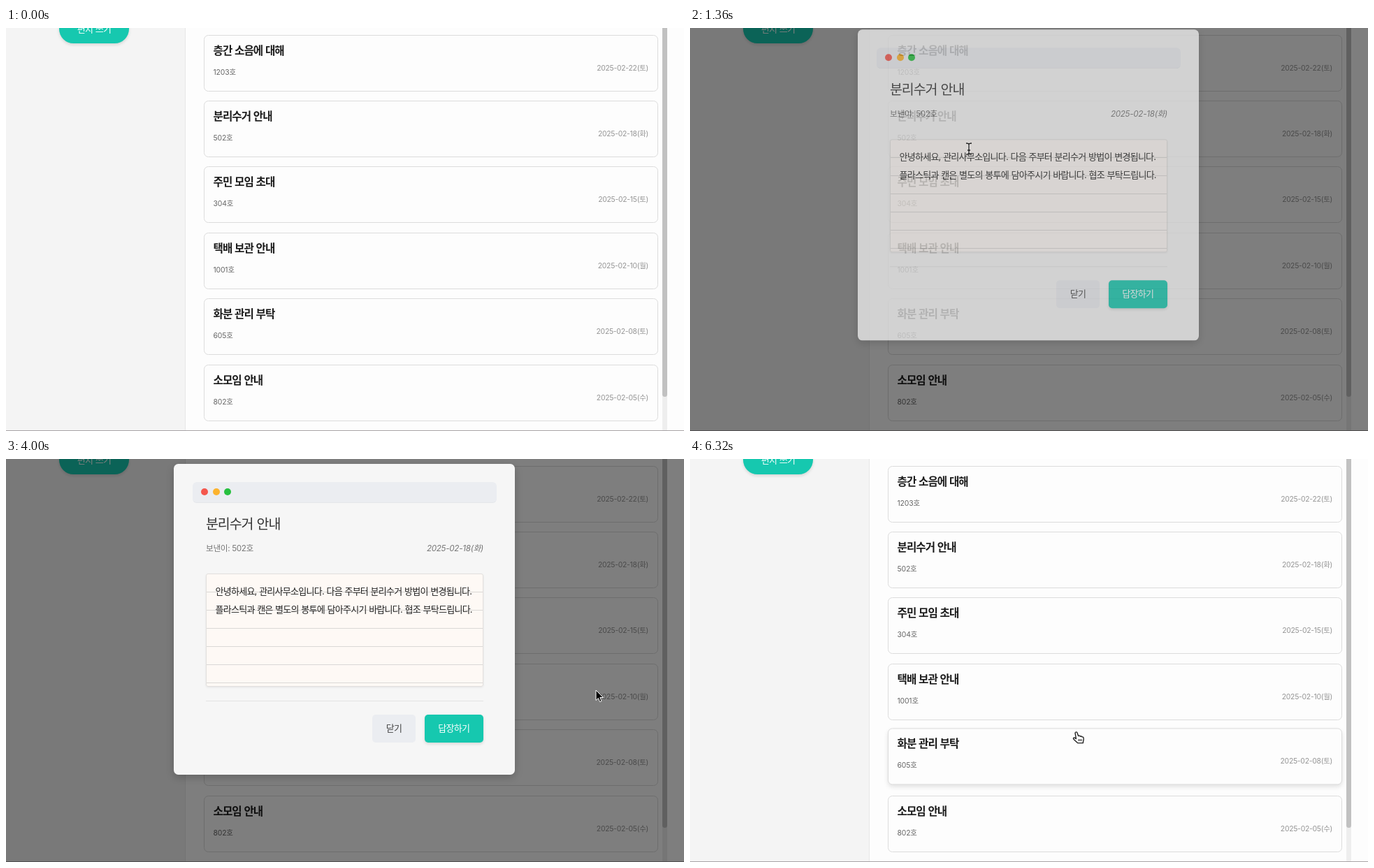
An HTML page for the animation above (6.4 s loop, 970x577 px).

```html
<!DOCTYPE html>
<html lang="ko">
<head>
<meta charset="utf-8">
<style>
html, body { margin: 0; width: 100%; height: 100%; overflow: hidden; }
body { position: relative; background: #fdfdfd; font: 13px Inter, "Noto Sans CJK KR", "Noto Sans CJK JP", sans-serif; }
div { position: absolute; box-sizing: border-box; white-space: nowrap; }
.full { inset: 0; }
.side { left: 0; top: 0; width: 257px; height: 577px; background: #f4f4f4; border-right: 1px solid #e7e7e7; }
.card { left: 283px; width: 650px; height: 81px; background: #fdfdfd; border: 1px solid #dcdcdc; border-radius: 6.5px; }
.t { height: 20px; line-height: 20px; }
.ko { letter-spacing: -.057em; word-spacing: .048em; }
.head { font-size: 15.6px; font-weight: 600; letter-spacing: -.061em; color: #1c1c1c; }
.room { font-size: 10.4px; letter-spacing: -.015em; color: #666; }
.date { font-size: 10.4px; letter-spacing: -.026em; color: #959595; }
.btn { text-align: center; border-radius: 5px; }
.teal { background: #16c8af; color: #fff; box-shadow: 0 2px 4px rgba(0,0,0,.13); }
.dot { top: 42px; width: 10px; height: 10px; border-radius: 50%; }
#dim { background: rgba(0,0,0,.5); }
.box { left: 240px; top: 7px; width: 488px; height: 445px; background: #f6f6f6; border-radius: 6.5px; box-shadow: 0 4px 12px rgba(0,0,0,.2); }
.bar { left: 267px; top: 33px; width: 435px; height: 30px; background: #ebedf1; border-radius: 6px; border-bottom: 1px solid #e4e6ea; }
.paper { left: 286px; top: 164px; width: 397px; height: 162px; border: 1px solid #e2e0de; border-radius: 3px; box-shadow: 0 1px 3px rgba(0,0,0,.08);
  background: repeating-linear-gradient(#fef9f5 0 25px, #dad8d6 25px 26px); }
svg { position: absolute; left: 0; top: 0; overflow: visible; }
</style>
</head>
<body>
<div class="side"></div>
<div class="btn teal ko" style="left:76px;top:-19px;width:100px;height:41px;line-height:41px;border-radius:21px">편지 쓰기</div>
<div id="list" class="full"></div>
<div style="left:939px;top:0;width:7px;height:577px;background:#eee"></div>
<div style="left:939px;top:-9px;width:7px;height:537px;background:#c1c1c1;border-radius:4px"></div>
<div style="left:0;top:576px;width:970px;height:1px;background:#a8a4a6"></div>
<div id="dim" class="full"></div>
<div id="modal" class="full">
  <div class="box"></div>
  <div class="bar"></div>
  <div class="dot" style="left:279px;background:#f4574d"></div>
  <div class="dot" style="left:295.5px;background:#fcb32e"></div>
  <div class="dot" style="left:312px;background:#27c03f"></div>
  <div class="t ko" style="left:286px;top:83px;font-size:19.5px;color:#333">분리수거 안내</div>
  <div class="t" style="left:286px;top:118px;font-size:11.7px;letter-spacing:-.03em;color:#777">보낸이: 502호</div>
  <div class="t" style="right:287px;top:118px;font-size:11.7px;letter-spacing:-.026em;font-style:italic;color:#777">2025-02-18(화)</div>
  <div class="paper"></div>
  <div class="t ko" style="left:299.5px;top:179px;color:#222">안녕하세요, 관리사무소입니다. 다음 주부터 분리수거 방법이 변경됩니다.</div>
  <div class="t ko" style="left:299.5px;top:205px;color:#222">플라스틱과 캔은 별도의 봉투에 담아주시기 바랍니다. 협조 부탁드립니다.</div>
  <div style="left:286px;top:346px;width:397px;height:1px;background:#e4e4e4"></div>
  <div id="close" class="btn ko" style="left:524px;top:366px;width:62px;height:40px;line-height:39px;color:#444">닫기</div>
  <div id="reply" class="btn teal ko" style="left:599px;top:366px;width:83.5px;height:40px;line-height:39px">답장하기</div>
</div>
<svg id="cursor" width="1" height="1">
  <g id="beam" fill="none">
    <path d="M0-7V7" stroke="#fff" stroke-opacity=".7" stroke-width="3"/>
    <path d="M-4-8Q0-8 0-6Q0-8 4-8M0-6V6M-4 8Q0 8 0 6Q0 8 4 8M-2 2H2" stroke="#222" stroke-width="1.4"/>
  </g>
  <path id="arrow" d="M0 0V14.5L3.4 11.4 5.6 16.6 8 15.6 5.8 10.5H10.5Z" fill="#000" stroke="#fff"/>
  <g id="hand" stroke="#222" stroke-width="1.4" stroke-linejoin="round">
    <path fill="#fff" d="M-2 1.2C-1.4-.6 .8-.4 1.1 1.2L2.6 5.6C4 4.8 5 5.2 5.4 6.2C6.6 5.6 7.4 6 7.9 6.9C9.4 6.6 9.9 7.6 10.1 9C10.4 11 10 12 9.6 13.2L9.3 15.6H1.6C0 13.8-2.4 12-4.2 10C-5.2 8.8-3.8 7.4-2.4 8.3L-.6 9.6Z"/>
    <path d="M3 10V13M5 10V13M7 10V13" stroke-width="1"/>
  </g>
</svg>
<script>
const $ = id => document.getElementById(id);
const LOOP = 6400, STEP = 80, OPEN = 1232, CLOSE = 5800;
const letters = [
  ['층간 소음에 대해', '1203호', '2025-02-22(토)'],
  ['분리수거 안내', '502호', '2025-02-18(화)'],
  ['주민 모임 초대', '304호', '2025-02-15(토)'],
  ['택배 보관 안내', '1001호', '2025-02-10(월)'],
  ['화분 관리 부탁', '605호', '2025-02-08(토)'],
  ['소모임 안내', '802호', '2025-02-05(수)']
];
const cards = letters.map(([title, room, date], i) => {
  const card = document.createElement('div');
  card.className = 'card';
  card.style.top = Math.floor(10 + 94.4 * i) + 'px';
  card.innerHTML = `<div class="t ko head" style="left:12.5px;top:12px">${title}</div>
    <div class="t room" style="left:12.5px;top:43px">${room}</div>
    <div class="t date" style="right:13px;top:37px">${date}</div>`;
  $('list').append(card);
  return card;
});

// hover spans: [from, to]
const cardHover = [[], [[520, OPEN]], [[400, 520]], [[240, 400]], [[80, 240], [CLOSE, 9e9]], []];
const closeHover = [[2480, 2640], [5150, 9e9]];
const replyHover = [[2680, 3400], [5000, 5120]];
// pointer path: time, x, y
const path = [[80, 500, 440], [720, 399, 173], [1680, 399, 173], [2480, 558, 366], [2880, 640, 384],
  [3280, 640, 384], [3840, 844, 331], [4640, 844, 331], [5280, 553, 391], [LOOP, 553, 391]];
const shapes = [[2080, 'beam'], [2480, 'arrow'], [3400, 'hand'], [5000, 'arrow'], [LOOP, 'hand']];

const ease = p => 1 - (1 - Math.min(1, Math.max(0, p))) ** 2.2;
const hover = (spans, t) => spans.reduce((s, [on, off]) => s + ease((t - on) / 200) - ease((t - off) / 200), 0);
const mix = (a, b, k) => `rgb(${a.map((v, i) => Math.round(v + (b[i] - v) * k))})`;

function pointer(t) {
  const i = Math.max(1, path.findIndex(p => p[0] > t));
  const [t0, x0, y0] = path[i - 1], [t1, x1, y1] = path[i];
  const p = Math.max(0, (t - t0) / (t1 - t0)), k = p * p * (3 - 2 * p);
  return [x0 + (x1 - x0) * k, y0 + (y1 - y0) * k];
}

function draw(t) {
  cards.forEach((card, i) => {
    const k = hover(cardHover[i], t);
    card.style.transform = k ? `translateY(${-1.6 * k}px)` : 'none';
    card.style.boxShadow = `0 3px 6px rgba(0,0,0,${0.11 * k})`;
  });
  const open = t >= OPEN && t < CLOSE, k = ease((t - OPEN) / 300);
  $('dim').style.display = $('modal').style.display = open ? 'block' : 'none';
  $('modal').style.opacity = k;
  $('modal').style.transform = k < 1 ? `translateY(${-16 * (1 - k)}px)` : 'none';
  $('close').style.background = mix([235, 237, 241], [226, 229, 233], hover(closeHover, t));
  $('reply').style.background = mix([22, 200, 175], [18, 184, 160], hover(replyHover, t));

  const [x, y] = pointer(t), shape = shapes.find(s => t < s[0])[1];
  $('cursor').style.display = t < 80 ? 'none' : 'block';
  $('cursor').style.transform = `translate(${x}px,${y}px)`;
  for (const id of ['beam', 'arrow', 'hand']) $(id).style.display = id === shape ? 'inline' : 'none';
}

const start = performance.now();
function tick() {
  const t = (performance.now() - start) % LOOP;
  draw(Math.floor(t / STEP) * STEP);
  requestAnimationFrame(tick);
}
tick();
</script>
</body>
</html>
```
